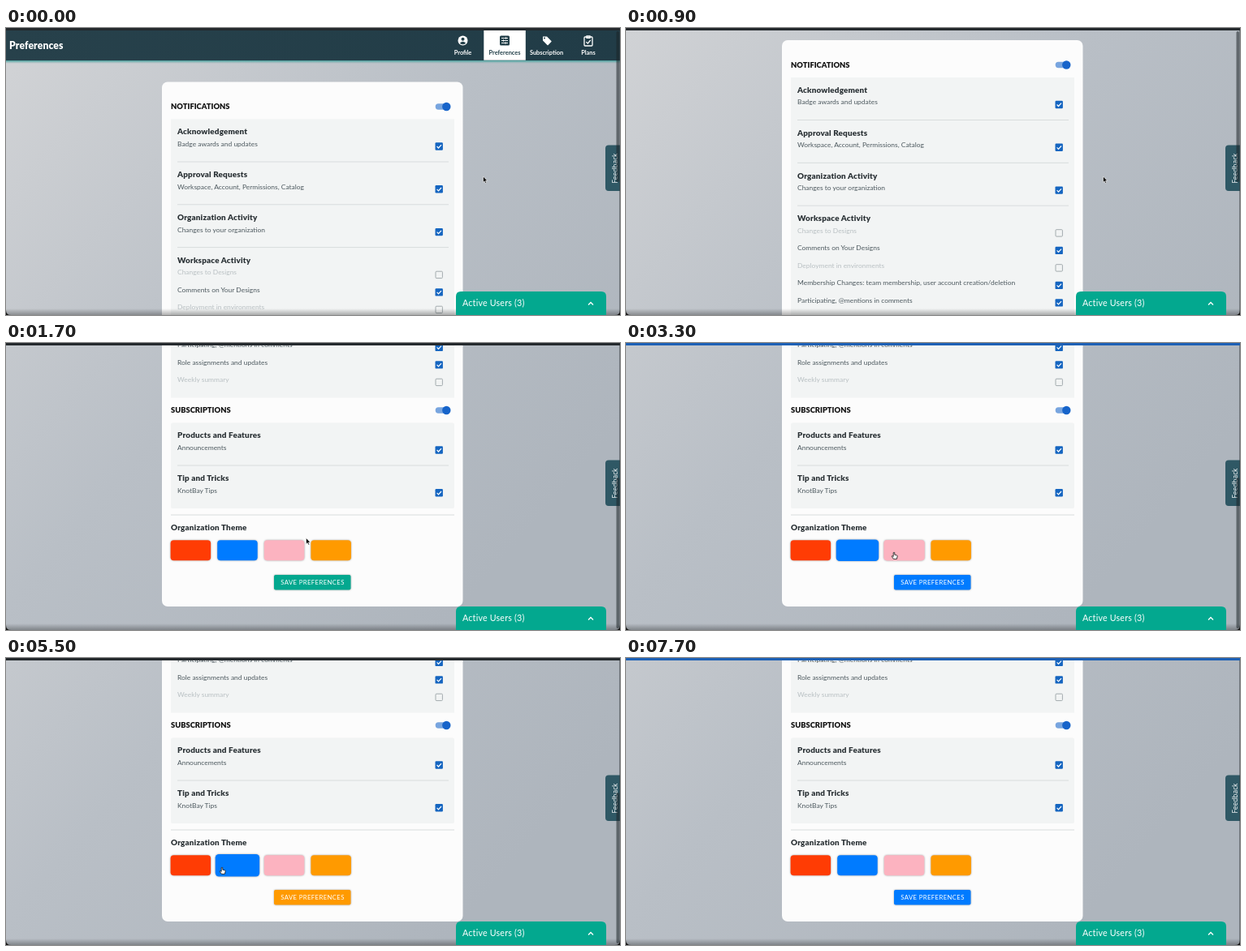
An HTML page for the animation above (8.2 s loop, 756 px wide and 354 px high).

```html
<!DOCTYPE html>
<html lang="en">
<head>
<meta charset="utf-8">
<title>Preferences</title>
<style>
html, body { margin: 0; width: 100%; height: 100%; overflow: hidden; background: #b9bfc6; }
svg { display: block; width: 756px; height: 354px; font-family: Lato, "Open Sans", sans-serif; }
.title { font-size: 12.2px; font-weight: 900; letter-spacing: .1px; fill: #fff; }
.nav { font-size: 7.4px; font-weight: 700; text-anchor: middle; fill: #fff; }
.section { font-size: 9.4px; font-weight: 900; fill: #111; }
.heading { font-size: 9.9px; font-weight: 900; letter-spacing: .17px; fill: #2b3236; }
.item { font-size: 8.45px; fill: #4d595f; }
.item.off { fill: #b9c0c3; }
.save { font-size: 7.7px; letter-spacing: .4px; text-anchor: middle; fill: #fff; }
.users { font-size: 10.7px; letter-spacing: .2px; fill: #fff; }
.feedback { font: 8.4px "Open Sans", sans-serif; text-anchor: middle; fill: #fff; }
.rule { stroke: #d8dcdd; }
.swatch { transform-box: fill-box; transform-origin: center; }
.swatch, #button { filter: drop-shadow(0 .7px .8px rgba(0,0,0,.35)); }
</style>
</head>
<body>
<svg viewBox="0 0 756 354">
  <defs>
    <linearGradient id="sky" gradientUnits="userSpaceOnUse" x1="0" y1="60" x2="640" y2="620">
      <stop offset="0" stop-color="#d0d2d5"/>
      <stop offset=".5" stop-color="#b9bfc6"/>
      <stop offset="1" stop-color="#aeb5bd"/>
    </linearGradient>
    <linearGradient id="head">
      <stop offset="0" stop-color="#27414b"/>
      <stop offset="1" stop-color="#213c47"/>
    </linearGradient>
    <linearGradient id="glow" x2="0" y2="1">
      <stop offset="0" stop-color="#3f9c98"/>
      <stop offset="1" stop-color="#7fb5b5" stop-opacity="0"/>
    </linearGradient>
    <linearGradient id="floor" x2="0" y2="1">
      <stop offset="0" stop-color="#000" stop-opacity="0"/>
      <stop offset="1" stop-color="#000" stop-opacity=".3"/>
    </linearGradient>
  </defs>

  <g id="page">
    <rect width="756" height="760" fill="url(#sky)"/>
    <rect y="40" width="756" height="4" fill="url(#glow)"/>
    <rect width="756" height="40" fill="url(#head)"/>
    <text class="title" x="4" y="26">Preferences</text>
    <rect x="588.3" y="3" width="51.5" height="36.7" fill="#fff"/>
    <text class="nav" x="562.5" y="33">Profile</text>
    <text class="nav" x="614" y="32.5" style="fill:#24404a">Preferences</text>
    <text class="nav" x="665.5" y="33">Subscription</text>
    <text class="nav" x="717" y="33">Plans</text>
    <g transform="translate(562.5 15.5)">
      <circle r="6" fill="#fff"/>
      <circle cy="-1.8" r="2" fill="#24404a"/>
      <path d="M-3.7 3.2Q0-.8 3.7 3.2Q0 6.4-3.7 3.2" fill="#24404a"/>
    </g>
    <g transform="translate(614 15.5)">
      <rect x="-6" y="-6" width="12" height="12" rx="1.5" fill="#24404a"/>
      <path d="M-4-3H4M-4 0H4M-4 3H4M1.5-4.2V-1.8M-1.5-1.2V1.2M1 1.8V4.2" stroke="#fff" stroke-width=".9"/>
    </g>
    <g transform="translate(666 15.5)">
      <path d="M-5-5H0L5.4.5Q6 1 5.4 1.6L1.6 5.4Q1 6 .4 5.4L-5 0Z" fill="#fff"/>
      <circle cx="-3" cy="-3" r="1" fill="#24404a"/>
    </g>
    <g transform="translate(717 15.5)" fill="none" stroke="#fff" stroke-width="1.3">
      <rect x="-5" y="-4.5" width="10" height="11" rx="1"/>
      <path d="M-2-5.6H2V-3.2H-2ZM-2.7 1.6L-.7 3.5L2.8-.6"/>
    </g>

    <rect x="192" y="66.5" width="370.5" height="643.5" rx="7" fill="#fcfcfc"/>
    <rect x="203" y="112.5" width="349" height="340" fill="#f2f4f4"/>
    <rect x="203" y="483.5" width="349" height="105.5" rx="2" fill="#f2f4f4"/>
    <g id="form"></g>
    <path class="rule" d="M203 597H552"/>
    <text class="heading" x="203" y="616">Organization Theme</text>
    <g id="swatches"></g>
    <rect id="button" x="330" y="671" width="94.5" height="18.5" rx="2"/>
    <text class="save" x="377.5" y="683">SAVE PREFERENCES</text>
  </g>

  <rect y="346" width="756" height="8" fill="url(#floor)"/>
  <rect id="bar" width="756" height="3"/>
  <path d="M756 144.5H742Q738 144.5 738 148.5V197Q738 201 742 201H756Z" fill="#2f5865"/>
  <text class="feedback" transform="translate(753 173) rotate(-90)">Feedback</text>
  <rect id="thumb" x="751.5" width="3.5" height="186" rx="1.7" fill="#1c2327"/>
  <path d="M554 354V331Q554 325 560 325H733Q739 325 739 331V354Z" fill="#03a88f"/>
  <text class="users" x="562" y="343.2">Active Users (3)</text>
  <path d="M717 341.5L720 338.5L723 341.5" fill="none" stroke="#fff" stroke-width="1.3"/>
  <path d="M755.5 3V354" stroke="#30363a" stroke-opacity=".5"/>
  <path d="M0 348Q0 354 6 354H0ZM756 348Q756 354 750 354H756Z" fill="#111"/>

  <g id="cursor">
    <path id="arrow" d="M0 0V7.4L1.7 5.9L2.9 8.6L4.1 8L3 5.5H5.2Z" fill="#000" stroke="#fff" stroke-width=".6"/>
    <path id="hand" d="M-.8.6Q0-.4.8.6V3.2L3.6 3.9Q4.3 4.2 4.1 5.2L3.4 8.4H-.6L-2.7 5.4Q-2.9 4.3-1.8 4.7L-.8 5.5Z" fill="#fff" stroke="#111" stroke-width=".8"/>
  </g>
</svg>

<script>
const $ = id => document.getElementById(id);
const LOOP = 8200, STEP = 100, SCROLL_END = 385;

// A leading "-" marks an unchecked, dimmed option.
const groups = [
  [128, "Acknowledgement", "Badge awards and updates"],
  [180.8, "Approval Requests", "Workspace, Account, Permissions, Catalog"],
  [233.6, "Organization Activity", "Changes to your organization"],
  [286.4, "Workspace Activity", "-Changes to Designs", "Comments on Your Designs",
    "-Deployment in environments",
    "Membership Changes: team membership, user account creation/deletion",
    "Participating, @mentions in comments", "Role assignments and updates", "-Weekly summary"],
  [499, "Products and Features", "Announcements"],
  [551.8, "Tip and Tricks", "KnotBay Tips"]
];

const text = (cls, x, y, label) => `<text class="${cls}" x="${x}" y="${y}">${label}</text>`;

const checkbox = (y, on) => on
  ? `<rect x="528.5" y="${y - 4.7}" width="9.4" height="9.4" rx="1.2" fill="#1565c0"/>
     <path d="M530.6 ${y}l1.9 2l3.5 -3.8" fill="none" stroke="#fff" stroke-width="1.2"/>`
  : `<rect x="529" y="${y - 4.2}" width="8.4" height="8.4" rx="1" fill="none" stroke="#a3abae"/>`;

const section = (y, label) => text("section", 203, y + 3.2, label) +
  `<rect x="528.7" y="${y - 3.7}" width="18" height="7.4" rx="3.7" fill="#78a5df"/>
   <circle cx="542.3" cy="${y}" r="5.2" fill="#1764ca"/>`;

const group = ([y, label, ...items]) => text("heading", 211, y + 3.4, label) +
  items.map((item, i) => {
    const on = item[0] !== "-", mid = y + 15.3 + i * 21.5;
    return text(on ? "item" : "item off", 211, mid + 2.6, on ? item : item.slice(1)) + checkbox(mid + 2.7, on);
  }).join("");

const rules = [165, 217.8, 270.6, 536].map(y => `<path class="rule" d="M211 ${y}H545"/>`);
$("form").innerHTML = section(97, "NOTIFICATIONS") + section(468, "SUBSCRIPTIONS") +
  groups.map(group).join("") + rules.join("");

const RED = [255, 60, 4], BLUE = [0, 123, 255], PINK = [252, 179, 192], ORANGE = [255, 154, 0];
const TEAL = [3, 168, 143], DARK = [36, 41, 45], BAR_BLUE = [29, 96, 181];
const rgb = c => `rgb(${c.map(Math.round)})`;

$("swatches").innerHTML = [RED, BLUE, PINK, ORANGE].map((c, i) =>
  `<rect class="swatch" x="${202.6 + i * 57.6}" y="628.2" width="49.5" height="25" rx="4" fill="${rgb(c)}"/>`).join("");
const swatches = [...document.querySelectorAll(".swatch")];

// Tracks are lists of [time, ...values].
const scrollTrack = [[800, 0], [900, 51.5], [1000, 150], [1100, 250], [1200, 330], [1300, 372], [1400, SCROLL_END]];
const cursorTrack = [
  [1400, 587.5, 183], [1700, 369.5, 240.5], [1850, 366, 243], [2250, 306, 256], [2600, 286, 258],
  [3100, 286, 258], [3300, 330, 258], [3550, 342, 258], [4050, 342, 258], [4350, 384, 258],
  [4700, 384, 258], [5000, 345, 258], [5300, 290, 258], [5500, 266, 258], [5700, 228, 258],
  [5950, 228, 258], [6300, 286, 262], [6700, 286, 262], [7100, 350, 362]
];
const hovers = [
  [1, 2250, 3170], [2, 3220, 4120], [3, 4180, 4850], [2, 4900, 5130], [1, 5170, 5520],
  [0, 5580, 6120], [1, 6120, 6800]
];
const themes = [[0, TEAL], [3000, BLUE], [3550, PINK], [4400, ORANGE], [5800, RED], [6600, BLUE]];

const clamp = x => Math.min(1, Math.max(0, x));
const ease = x => x * x * (3 - 2 * x);
const mix = (a, b, k) => a.map((v, i) => v + (b[i] - v) * k);

function sample(track, t) {
  const next = track.findIndex(key => key[0] > t);
  if (next === 0) return track[0].slice(1);
  if (next < 0) return track[track.length - 1].slice(1);
  const a = track[next - 1], b = track[next];
  return mix(a.slice(1), b.slice(1), (t - a[0]) / (b[0] - a[0]));
}

function hoverAmount(i, t) {
  return Math.max(0, ...hovers.filter(h => h[0] === i).map(([, from, to]) =>
    ease(clamp((t - from) / 300)) * (1 - ease(clamp((t - to) / 300)))));
}

function paint(t) {
  const [scroll] = sample(scrollTrack, t);
  $("page").setAttribute("transform", `translate(0 ${-scroll})`);

  // The scrollbar trails the page by one step.
  const [trailing] = sample(scrollTrack, t - STEP);
  $("thumb").setAttribute("y", 4 + 162 * trailing / SCROLL_END);
  $("thumb").setAttribute("opacity", .55 * (1 - clamp((t - 7400) / 300)));

  const [x, y] = sample(cursorTrack, t);
  const pointing = hovers.some(([, from, to]) => t >= from && t < to);
  $("cursor").setAttribute("transform", `translate(${x} ${y})`);
  $("arrow").style.display = pointing ? "none" : "";
  $("hand").style.display = pointing ? "" : "none";

  swatches.forEach((el, i) => el.style.transform = `scale(${1 + .1 * hoverAmount(i, t)})`);

  const now = themes.filter(([start]) => start <= t).length - 1;
  const [start, color] = themes[now], before = themes[Math.max(0, now - 1)][1];
  const barOf = c => c === BLUE ? BAR_BLUE : DARK;
  const k = ease(clamp((t - start) / 250));
  $("button").setAttribute("fill", rgb(mix(before, color, k)));
  $("bar").setAttribute("fill", rgb(mix(barOf(before), barOf(color), k)));
}

const origin = performance.now();
function tick() {
  const t = (performance.now() - origin) % LOOP;
  paint(Math.floor(t / STEP) * STEP);
  requestAnimationFrame(tick);
}
tick();
</script>
</body>
</html>
```
